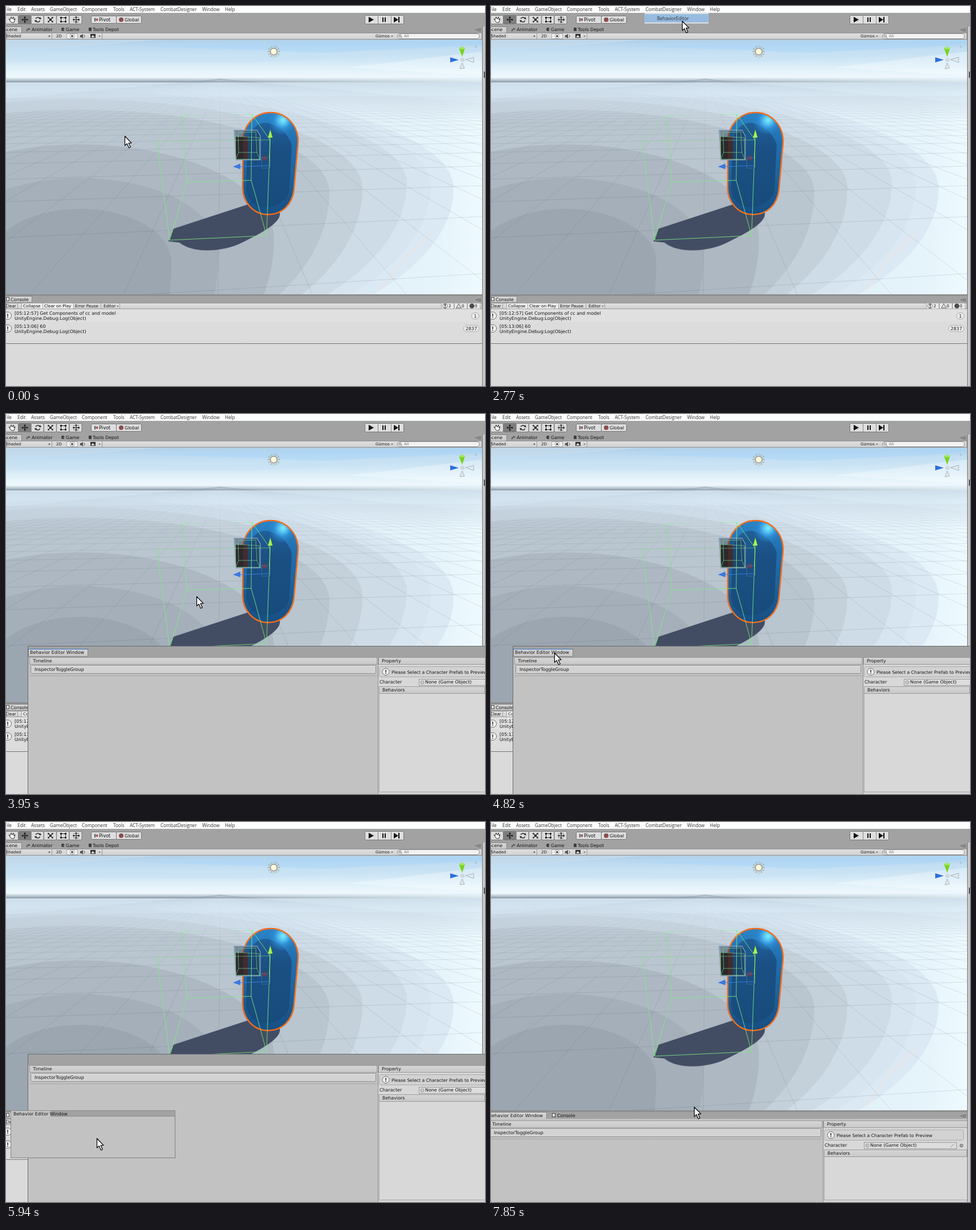
An HTML page with a canvas for the animation above (8 s loop, 840x667 px).

```html
<!DOCTYPE html>
<html lang="en">
<head>
<meta charset="utf-8">
<title>Editor window docking</title>
<style>
html, body { margin: 0; width: 100%; height: 100%; overflow: hidden; background: #a2a2a2; }
canvas { display: block; width: 840px; height: 667px; }
</style>
</head>
<body>
<canvas id="stage" width="840" height="667"></canvas>
<script>
const W = 840, H = 667, LOOP = 8000;
const stage = document.getElementById('stage');
let g = stage.getContext('2d');

// ---------- drawing helpers ----------
function rect(x, y, w, h, fill, stroke) {
  if (fill) { g.fillStyle = fill; g.fillRect(x, y, w, h); }
  if (stroke) { g.strokeStyle = stroke; g.lineWidth = 1; g.strokeRect(x + .5, y + .5, w - 1, h - 1); }
}
function pill(x, y, w, h, r, fill, stroke) {
  g.beginPath();
  g.roundRect(x + .5, y + .5, w - 1, h - 1, r);
  paint(fill, stroke);
}
function paint(fill, stroke, width = 1) {
  if (fill) { g.fillStyle = fill; g.fill(); }
  if (stroke) { g.strokeStyle = stroke; g.lineWidth = width; g.stroke(); }
}
function poly(pts, fill, stroke, width) {
  g.beginPath();
  for (let i = 0; i < pts.length; i += 2) g.lineTo(pts[i], pts[i + 1]);
  g.closePath();
  paint(fill, stroke, width);
}
function line(color, width, ...pts) {
  g.beginPath();
  for (let i = 0; i < pts.length; i += 2) g.lineTo(pts[i], pts[i + 1]);
  paint(null, color, width);
}
function disc(x, y, r, fill, stroke, width) {
  g.beginPath();
  g.arc(x, y, r, 0, 7);
  paint(fill, stroke, width);
}
function fade(x0, y0, x1, y1, ...stops) {
  const f = g.createLinearGradient(x0, y0, x1, y1);
  for (let i = 0; i < stops.length; i += 2) f.addColorStop(stops[i], stops[i + 1]);
  return f;
}
function text(s, x, y, size = 7.95, color = '#141414') {
  g.font = size + 'px "DejaVu Sans", sans-serif';
  g.fillStyle = color;
  g.fillText(s, x, y);
}
function menuText(s, x, y) {
  g.font = '8.1px "Open Sans", sans-serif';
  g.fillStyle = '#333';
  g.fillText(s, x, y);
}
const down = (x, y, s = 2) => poly([x - s, y - s / 2, x + s, y - s / 2, x, y + s * .8], '#444');

// ---------- 3D view ----------
function sky() {
  rect(0, 59, 835, 76, fade(0, 59, 0, 135, 0, '#b0d0e8', .2, '#bfdcf2', .5, '#d2e8f6',
    .72, '#e4f3fa', .87, '#eef8fc', .93, '#bccad4', .98, '#8f9da8', 1, '#b4c3ce'));
  poly([0, 59, 270, 59, 120, 72, 0, 76], 'rgba(205,222,235,.5)');
  poly([0, 82, 380, 90, 835, 72, 835, 80, 420, 100, 0, 98], 'rgba(200,226,244,.5)');
  poly([230, 70, 520, 64, 835, 59, 835, 68, 560, 82], 'rgba(165,212,250,.45)');
  poly([835, 80, 600, 108, 835, 122], 'rgba(255,255,255,.3)');
  rect(300, 126, 535, 9, fade(300, 0, 835, 0, 0, 'rgba(230,243,250,0)', 1, 'rgba(230,243,250,.85)'));
}
// Light falls off in rings: [right edge, top, centre y, colour]
const rings = [
  [785, 136, 320, '#dbe9f5'], [745, 143, 315, '#d7e5f0'], [703, 150, 310, '#cedce7'],
  [625, 164, 320, '#c4d0da'], [567, 182, 326, '#b9c5cf'], [470, 243, 410, '#adb8c3'],
  [373, 302, 430, '#a4afba'], [290, 356, 450, '#9ba6b1']
];
function ground() {
  rect(0, 134, 835, 372, fade(300, 0, 835, 0, 0, '#dceaf5', .85, '#e5f3fa', 1, '#eefaff'));
  for (const [right, top, cy, color] of rings) {
    g.beginPath();
    g.ellipse(130, cy, right - 130, cy - top, 0, Math.PI, 0);
    g.ellipse(130, cy, right - 130, 300, 0, 0, Math.PI);
    paint(color);
  }
  line('rgba(240,222,216,.35)', 5, 655, 500, 700, 440, 748, 398);
  rect(0, 134, 835, 70, fade(0, 134, 0, 204, 0, 'rgba(203,221,234,.9)', .3, 'rgba(211,228,241,.6)', 1, 'rgba(211,228,241,0)'));

  // Grid rays share one vanishing point; cross lines recede evenly
  const ray = fade(0, 140, 0, 300, 0, 'rgba(70,85,100,.03)', .4, 'rgba(70,85,100,.1)', 1, 'rgba(70,85,100,.2)');
  for (let k = -24; k <= 24; k++) line(ray, .8, 376, 128, 372 + k * 165, 506);
  for (let z = 2.4; z < 30; z++) {
    const dy = 880 / z, y = 130 + dy, tilt = dy * .00017;
    line(`rgba(70,85,100,${Math.min(.2, dy / 700)})`, .8, 0, y + 400 * tilt, 835, y - 435 * tilt);
  }
}
function capsulePath() {
  g.beginPath();
  g.moveTo(415.5, 238);
  g.bezierCurveTo(415.5, 209, 437, 187, 464, 187);
  g.bezierCurveTo(492, 187, 514, 211, 512, 241);
  g.lineTo(505, 322);
  g.bezierCurveTo(502, 349, 484, 366, 460, 366);
  g.bezierCurveTo(434, 366, 415, 345, 415, 318);
  g.closePath();
}
function capsule() {
  g.save();
  capsulePath();
  g.clip();
  rect(410, 180, 110, 190, fade(0, 187, 0, 366, 0, '#2b84c8', .3, '#216faf', .65, '#1c619a', 1, '#174e82'));
  g.beginPath();
  g.moveTo(423, 250);
  g.bezierCurveTo(424, 222, 436, 206, 455, 205);
  g.bezierCurveTo(478, 207, 496, 226, 501, 244);
  g.lineTo(497, 325);
  g.bezierCurveTo(490, 354, 430, 372, 421, 322);
  g.closePath();
  paint(fade(0, 205, 0, 360, 0, '#205f98', .3, '#1a5083', 1, '#174b7c'));
  const shine = g.createRadialGradient(486, 200, 1, 484, 202, 25);
  shine.addColorStop(0, '#7aeafb');
  shine.addColorStop(.3, '#4fbdf0');
  shine.addColorStop(.6, 'rgba(50,146,218,.65)');
  shine.addColorStop(1, 'rgba(40,130,205,0)');
  rect(440, 180, 76, 60, shine);
  g.restore();
  capsulePath();
  paint(null, '#f26c1c', 2.5);
}
function hitBox() {
  const c = 'rgba(125,238,125,.85)', soft = 'rgba(140,240,140,.5)';
  line(c, 1, 265, 238, 287, 411, 457, 403, 463, 235);
  line(soft, 1, 265, 238, 463, 235);
  line(c, 1, 308, 192, 317, 309, 430, 306, 431, 190);
  line(c, 1, 317, 309, 287, 411);
  line(c, 1, 430, 306, 457, 403);
  line(c, 1, 431, 190, 463, 235);
  line(soft, 1, 265, 238, 308, 192, 345, 192);
  line(soft, 1, 402, 190, 431, 190);
}
function hand() {
  poly([400, 218, 440, 218, 446, 228, 446, 270, 403, 270], 'rgba(30,55,85,.45)');
  poly([403, 229, 424, 229, 424, 270, 403, 270], '#2b292d');
  rect(416, 229, 8, 40, '#432d2c');
  poly([400, 218, 440, 218, 446, 228, 446, 270, 403, 270], null, '#8b9fbe', 1.3);
  const c = 'rgba(135,232,150,.75)';
  line(c, .8, 402, 220, 403, 269, 445, 269, 444, 231, 402, 229);
  line(c, .8, 407, 222, 408, 257, 440, 257, 438, 221, 407, 222);
  line(c, .8, 408, 257, 403, 269);
  line(c, .8, 440, 257, 445, 269);
}
function gizmos() {
  line('#a6ee4e', 1, 463, 230, 462, 284);
  poly([463.5, 217, 467.5, 231, 459.5, 231], '#a8f04b');
  line('#357ee0', 1, 411, 282, 462, 280);
  poly([398, 282, 411, 276.5, 411, 286.5], '#3b78e0');
  rect(449, 263, 9, 8, 'rgba(120,60,70,.65)');
  rect(448, 266, 14, 19, null, 'rgba(65,120,180,.7)');

  for (let i = 0; i < 12; i++) {
    const a = i * Math.PI / 6, c = Math.cos(a), s = Math.sin(a);
    line('#77776c', 1.8, 469.5 + c * 7, 80 + s * 7, 469.5 + c * 10.5, 80 + s * 10.5);
    line('#fffbe0', 1, 469.5 + c * 7, 80 + s * 7, 469.5 + c * 10, 80 + s * 10);
  }
  disc(469.5, 80, 5.8, '#fff9d9', '#6a6a60', 1);

  poly([794.5, 74, 805, 74, 800, 89], '#77d31b');
  g.beginPath(); g.ellipse(800, 74, 5.3, 2, 0, 0, 7); paint('#a0e958');
  poly([779, 90, 779, 99, 794, 94.5], '#2f6de0');
  poly([820, 90, 820, 99, 806, 94], '#e1eaf0', '#8e9aa4', .7);
  poly([796, 110, 804, 109, 800, 100], '#e1eaf0', '#8e9aa4', .7);
  rect(797, 91, 7, 7, '#d0d9df');
  text('y', 798, 71, 6, '#a8d99b');
  rect(822, 70, 4, 3, '#b4c6d2');
}
function shadow() {
  g.beginPath();
  g.moveTo(285, 413);
  g.lineTo(294, 391);
  g.lineTo(424, 348.5);
  g.lineTo(480, 362);
  g.bezierCurveTo(484, 382, 440, 402, 410, 417);
  g.bezierCurveTo(382, 430, 330, 436, 304, 415);
  g.closePath();
  paint('#424d64', 'rgba(66,77,100,.35)', 1);
}
function scene() {
  g.save();
  g.beginPath(); g.rect(0, 59, 835, 447); g.clip();
  sky();
  ground();
  shadow();
  capsule();
  hand();
  hitBox();
  gizmos();
  g.restore();
}

// ---------- editor chrome ----------
function button(x, y, w, h, fill = '#dedede') { pill(x, y, w, h, 2, fill, '#777'); }
function arrowCross(x, y, r, color, turn = 0) {
  for (let i = 0; i < 4; i++) {
    g.save(); g.translate(x, y); g.rotate(turn + i * Math.PI / 2);
    line(color, 1.2, 0, 0, r, 0);
    poly([r + 1.5, 0, r - 1.5, -2, r - 1.5, 2], color);
    g.restore();
  }
}
function toolIcons() {
  for (let i = 0; i < 6; i++) button(i * 22.3 - 1, 16, 23, 16, i === 1 ? '#7d7d7d' : '#dcdcdc');
  const k = '#2a2a2a';
  poly([7, 24, 5, 22, 8, 27, 10, 29, 14, 29, 16, 22, 14, 24, 13, 19, 11, 23, 9, 19], '#fff', k, 1);
  arrowCross(33, 24, 4.5, '#161616');
  g.beginPath(); g.arc(56, 24, 4, 3.5, 6); paint(null, k, 1.5);
  g.beginPath(); g.arc(56, 24, 4, .4, 2.8); paint(null, k, 1.5);
  poly([58, 23, 62, 23, 60, 19], k);
  poly([50, 25, 54, 25, 52, 29], k);
  rect(76, 22, 4, 4, k);
  arrowCross(78, 24, 5.5, k, Math.PI / 4);
  rect(96, 20, 9, 8, null, k);
  for (const [x, y] of [[96, 20], [104, 20], [96, 27], [104, 27]]) rect(x - 1, y - 1, 3, 3, k);
  arrowCross(123, 24, 4.5, k);
  g.setLineDash([2, 2]); disc(123, 24, 5.5, null, k); g.setLineDash([]);
}
function gear(x, y) { line('#555', 1, x - 2, y - 1.5, x + 4, y - 1.5); line('#555', 1, x - 2, y + 1.5, x + 4, y + 1.5); down(x - 4, y, 1.5); }
function tab(x, y, w, h) {
  rect(x, y, w, h, fade(0, y, 0, y + h, 0, '#d9d9d9', 1, '#c6c6c6'), '#858585');
}
function chrome() {
  rect(0, 0, W, H, '#a2a2a2');
  rect(0, 0, W, 12, '#fcfdfd');
  const menu = [['File', -3], ['Edit', 20], ['Assets', 44], ['GameObject', 77], ['Component', 133], ['Tools', 188],
    ['ACT-System', 217], ['CombatDesigner', 271], ['Window', 344], ['Help', 384]];
  for (const [s, x] of menu) menuText(s, x, 9);

  toolIcons();
  button(149, 17, 45, 14); button(193, 17, 45, 14);
  rect(155, 21, 2, 6, '#555'); rect(158, 22, 3, 4, '#a24a4a');
  text('Pivot', 163, 27, 8.3);
  disc(202, 24, 4, '#9b4848'); disc(201, 23, 2, '#606060');
  text('Global', 208, 27);
  button(629, 16, 69, 16);
  line('#8a8a8a', 1, 652.5, 17, 652.5, 31); line('#8a8a8a', 1, 675.5, 17, 675.5, 31);
  poly([636, 19, 636, 29, 645, 24], '#111');
  rect(660, 20, 2, 8, '#111'); rect(664, 20, 2, 8, '#111');
  poly([680, 19, 680, 29, 688, 24], '#111'); rect(688, 19, 2, 10, '#111');

  tab(-2, 36, 30, 12);
  text('Scene', -4, 44);
  disc(40, 40, 1.6, '#555'); disc(37, 43, 1.3, '#555'); line('#555', 1, 36, 41, 43, 41);
  text('Animator', 45, 44);
  disc(100, 41, 3, '#3c3c3c'); poly([100, 41, 104, 39, 104, 43], '#a2a2a2');
  text('Game', 105, 44);
  rect(145, 38, 5, 6, '#3d3d3d');
  text('Tools Depot', 152, 44);
  gear(829, 42);

  rect(0, 47, 835, 12, fade(0, 47, 0, 59, 0, '#e0e0e0', 1, '#cfcfcf'), '#929292');
  text('Shaded', 0, 55, 6.95);
  down(76, 53);
  line('#999', 1, 80.5, 48, 80.5, 58);
  text('2D', 88, 55, 6.95);
  rect(106, 48, 20, 10, '#eee', '#aaa');
  disc(116, 53, 1.8, '#333');
  for (let i = 0; i < 8; i++) disc(116 + 4 * Math.cos(i * .785), 53 + 4 * Math.sin(i * .785), .6, '#333');
  poly([130, 51, 132, 51, 135, 49, 135, 57, 132, 55, 130, 55], '#555');
  g.beginPath(); g.arc(135, 53, 3, -1, 1); paint(null, '#555');
  rect(148, 49, 9, 7, '#333'); poly([149, 55, 152, 51, 156, 55], '#ddd');
  down(164, 53, 1.6);
  line('#999', 1, 168.5, 48, 168.5, 58);
  text('Gizmos', 648, 55, 6.7);
  down(677, 53, 1.7);
  pill(686, 48, 145, 10, 5, '#f1f1f1', '#888');
  disc(691, 52.5, 2, null, '#666'); line('#666', 1, 692.5, 54, 695, 56);
  text('All', 698, 55, 6.9, '#777');

  rect(835, 36, 5, H - 36, '#c8c8c8');
  line('#777', 1, 835.5, 36, 835.5, H);
  rect(838, 115, 2, 11, '#555');
  scene();
  rect(0, 506, 835, 3, '#8f8f8f');
  rect(0, 509, 835, 12, '#a2a2a2');
  gear(829, 516);
}
function notice(x, y, r = 6.5) {
  disc(x, y, r, '#f7f7f7', '#666', 1);
  rect(x - .8, y - 3.5, 1.7, 4.5, '#333');
  rect(x - .8, y + 2, 1.7, 1.7, '#333');
}
function consoleIcon(x) { rect(x, 511, 6, 7, '#e2e2e2', '#444'); }
function consolePane() {
  tab(-2, 509, 48, 12);
  consoleIcon(0);
  text('Console', 8, 518);
  rect(0, 521, 835, 11, fade(0, 521, 0, 532, 0, '#e2e2e2', 1, '#d0d0d0'), '#979797');
  rect(27, 521, 92, 11, '#eeeeee', '#a0a0a0');
  for (const x of [20, 64, 118, 166, 199]) line('#a0a0a0', 1, x + .5, 522, x + .5, 531);
  text('Clear', -1, 529, 7.2);
  text('Collapse', 30, 529, 7.2);
  text('Clear on Play', 67, 529, 7.2);
  text('Error Pause', 121, 529, 7.2);
  text('Editor', 171, 529, 7.2);
  down(196, 527, 1.5);
  for (const x of [763, 786, 809]) rect(x, 521, 23, 11, '#eaeaea', '#a8a8a8');
  notice(770, 526.5, 4);
  poly([794, 522.5, 798.5, 530, 789.5, 530], '#ddd', '#555', .9);
  disc(817, 526.5, 4.3, '#4a4a4a');
  text('2', 776, 529, 7.2); text('0', 799, 529, 7.2); text('0', 822, 529, 7.2);

  rect(0, 532, 835, 60, '#dcdcdc');
  rect(0, 532, 835, 22, '#e0e0e0');
  rect(0, 592, 835, 75, '#dadada');
  line('#777', 1, 0, 592.5, 835, 592.5);
  const log = 'UnityEngine.Debug:Log(Object)';
  notice(3, 543.5); notice(3, 566);
  text('[05:12:57] Get Components of cc and model', 15, 542); text(log, 15, 551);
  text('[05:13:06] 60', 15, 565); text(log, 15, 574);
  pill(816, 538, 14, 12, 6, '#ededed', '#aaa'); text('1', 820.5, 547);
  pill(802, 560, 28, 12, 6, '#ededed', '#aaa'); text('2837', 806, 569);
}

// ---------- behaviour window ----------
const TITLE = 'Behavior Editor Window';
function header(s, x, y, w) {
  rect(x, y, w, 13, fade(0, y, 0, y + 13, 0, '#d6d6d6', 1, '#c8c8c8'), '#9a9a9a');
  text(s, x + 6, y + 9);
}
function panel(x, y, split, right) {
  rect(x, y, right - x, H - y, '#c2c2c2');
  header('Timeline', x + 2, y, split - x - 3);
  pill(x + 4, y + 14, split - x - 7, 15, 1, '#d3d3d3', '#8c8c8c');
  line('#eee', 1, x + 5, y + 15.5, split - 4, y + 15.5);
  text('InspectorToggleGroup', x + 11, y + 24);
  line('#a6a6a6', 1, x + 2, y + 32.5, split - 1, y + 32.5);
  rect(split, y, right - split, H - y, '#d8d8d8');
  line('#8a8a8a', 1, split + .5, y, split + .5, H);
  header('Property', split + 1, y, right - split);
  pill(split + 2, y + 16, right - split - 8 + (right > 835 ? 20 : 0), 19, 2, '#d2d2d2', '#a9a9a9');
  notice(split + 14, y + 25.5, 6);
  text('Please Select a Character Prefab to Preview', split + 24, y + 29, 7.7);
  text('Character', split + 3, y + 46);
  rect(split + 72, y + 38, 163, 12, '#dddddd', '#969696');
  disc(split + 78, y + 44, 3, '#c9c9c9', '#999');
  text('None (Game Object)', split + 83, y + 46);
  line('#888', 1, split + 224, y + 47, split + 230, y + 41);
  disc(split + 243, y + 44, 2.5, null, '#444'); disc(split + 243, y + 44, .8, '#444');
  rect(split + 2, y + 51, right - split, H - y - 54, '#d8d8d8', '#a2a2a2');
  header('Behaviors', split + 2, y + 51, right - split - 2);
}
function floating(hasTab) {
  rect(38, 407, 802, 260, '#a2a2a2');
  if (hasTab) {
    tab(39, 412, 105, 14);
    rect(39, 412, 105, 1.5, '#5a86c0');
    text(TITLE, 42, 421);
  }
  panel(39, 427, 652, 840);
  line('#666b70', 1, 38.5, H, 38.5, 407.5, W, 407.5);
}
function docked() {
  tab(-2, 509, 100, 13);
  text(TITLE, -4, 518);
  consoleIcon(107);
  text('Console', 116, 518);
  rect(0, 521, 835, 3, '#c2c2c2');
  g.save();
  g.beginPath(); g.rect(0, 521, 835, 146); g.clip();
  panel(-6, 524, 582, 835);
  g.restore();
}
function ghost(x, y) {
  rect(x, y, 289, 84, '#c2c2c2', '#808080');
  rect(x, y, 289, 11, '#a2a2a2', '#8a8a8a');
  rect(x + 1, y + 1, 69, 10, '#c4c4c4');
  text(TITLE, x + 5, y + 9);
}
function dockHint() {
  rect(0, 509, 9, 12, '#a2a2a2');
  tab(8, 509, 70, 12);
  text('Behavior Editor', 12, 518);
}
function menuItem(hot) {
  if (hot) rect(269, 14, 113, 15, '#97bce0');
  menuText('BehaviorEditor', 291, 25);
}
function popup(hot) {
  rect(269, 12, 113, 19, '#f3f3f3', '#c8c8c8');
  menuItem(hot);
}

// ---------- pointer ----------
// Each leg advances in even steps from one time to the next
const legs = [
  [0, 0, [208, 228]],
  [120, 1050, [201, 216, 192, 192, 194, 160, 200, 125, 207, 90, 215, 55, 224, 27, 233, 9]],
  [1170, 2100, [250, 7, 271, 8, 283, 9, 290, 9, 293, 10, 303, 15, 315, 21, 325, 26]],
  [2220, 2340, [331, 33, 335, 36]],
  [2620, 2770, [336, 31, 335, 26]],
  [3200, 4100, [335, 26, 337, 60, 338, 110, 338, 175, 337, 250, 334, 320, 329, 370, 323, 405]],
  [4250, 4820, [290, 410, 235, 414, 170, 417, 125, 419, 111, 419]],
  [5250, 6210, [125, 440, 150, 480, 172, 525, 180, 570, 175, 586, 159, 555, 135, 562, 111, 574]],
  [6330, 6750, [80, 560, 50, 540, 32, 526, 25, 519]],
  [7150, 7850, [40, 517, 110, 511, 190, 506, 270, 502, 330, 500, 356, 500]]
];
function pointer(t) {
  const [from, to, pts] = legs.findLast(l => l[0] <= t);
  const last = pts.length / 2 - 1;
  const gap = (to - from) / last || 1;
  const i = Math.min(last, Math.floor((t - from + 12) / gap));
  return [pts[2 * i], pts[2 * i + 1]];
}
function arrow(x, y) {
  g.save();
  g.translate(x + .5, y);
  g.lineJoin = 'round';
  poly([0, .5, 0, 17, 3.7, 13.6, 7, 21, 9.8, 19.8, 6.6, 12.6, 11.5, 12.3], '#fff', '#000', 1.2);
  g.restore();
}

// ---------- playback ----------
const backdrop = document.createElement('canvas');
backdrop.width = W; backdrop.height = H;
const screen = g;
g = backdrop.getContext('2d');
chrome();
g = screen;

function draw(t) {
  const [x, y] = pointer(t);
  g.drawImage(backdrop, 0, 0);
  if (t < 7150) consolePane(); else docked();
  if (t >= 1830 && t < 3200) popup(y > 12 && y < 32);
  if (t >= 3200 && t < 3320) menuItem(true);
  if (t >= 3200 && t < 7150) floating(t < 5250);
  if (t >= 5250 && t < 7150) {
    if (y < 535 && x < 40) dockHint();
    else ghost(x - 151, y - 49);
  }
  arrow(x, y);
}
const start = performance.now();
function tick() {
  draw((performance.now() - start) % LOOP);
  requestAnimationFrame(tick);
}
tick();
</script>
</body>
</html>
```
